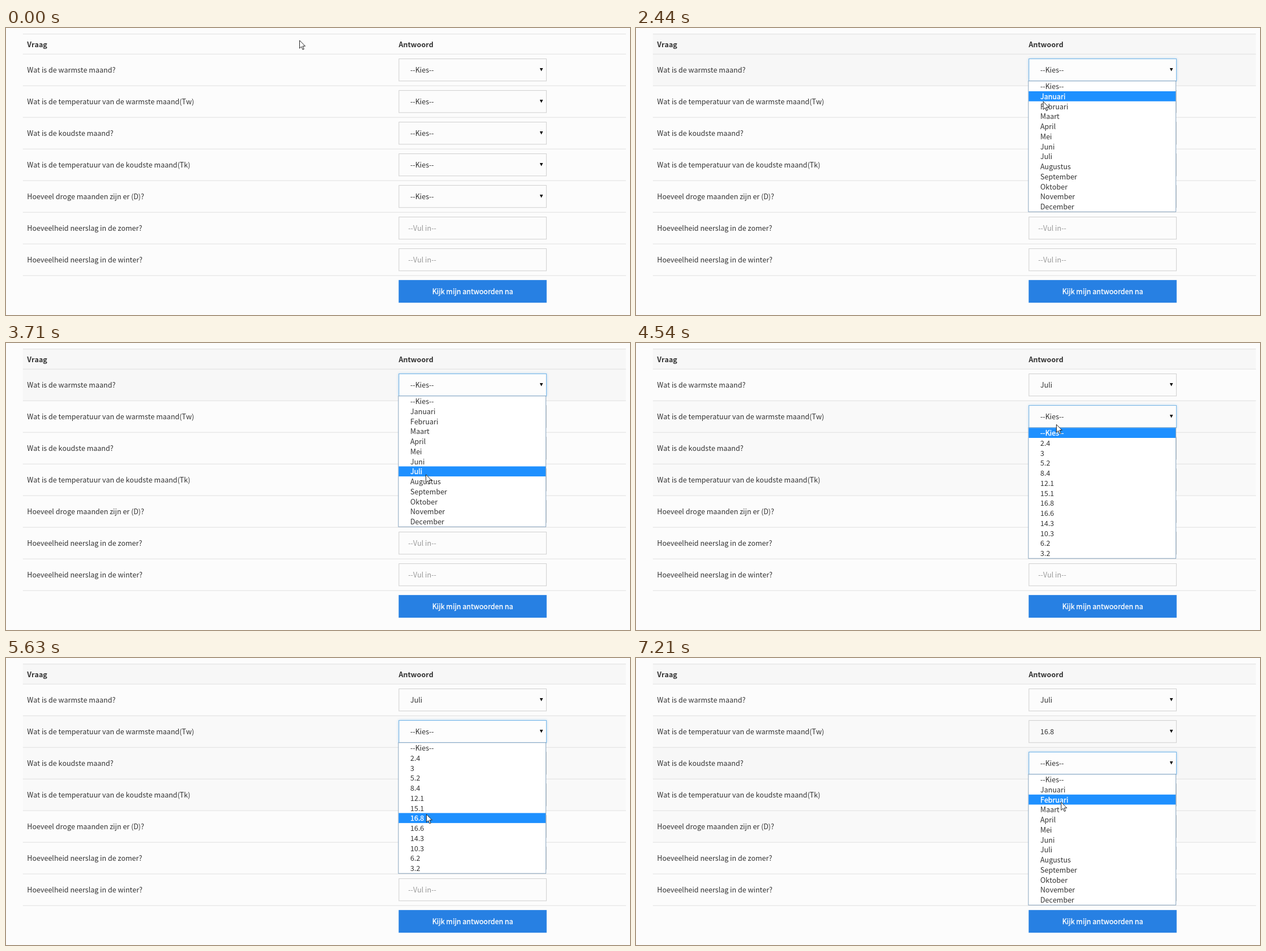
Recreate the animation shown at these times as an HTML page. Size 1102 by 508 pixels, loop 8000 ms.

```html
<!DOCTYPE html>
<html lang="nl">
<head>
<meta charset="utf-8">
<title>Klimaatvragen</title>
<style>
html, body { margin: 0; width: 100%; height: 100%; overflow: hidden; background: #fcfcfc; }
svg { display: block; }
text {
  font: 13.42px "Noto Sans CJK JP", "Noto Sans CJK SC", "Noto Sans CJK", "Open Sans", sans-serif;
  font-kerning: none; fill: #333; white-space: pre;
}
.head { font-weight: bold; }
.hint { fill: #999; }
.light { fill: #fff; stroke: #fff; stroke-width: .35px; }
.line { stroke: #ddd; }
.box { fill: none; stroke: #ccc; }
.focus { fill: #fdfdfd; stroke: #66afe9; filter: drop-shadow(0 0 2px rgba(102, 175, 233, .45)); }
.list { fill: #fff; stroke: #7f9db9; }
</style>
</head>
<body>
<svg width="1102" height="508" viewBox="0 0 1102 508"><g id="page"></g></svg>
<script>
// The page is laid out in whole pixels and shown at 14/15 of its size
const SCALE = 14 / 15, LOOP = 8000;
const PITCH = 60, ITEM = 19, LEFT = 743, BOX_W = 280, BOX_H = 43;
const KIES = '--Kies--';
const PAGE = '#fcfcfc', HOVER = '#f7f7f7', FAINT = '#f9f9f9';
const page = document.getElementById('page');
page.setAttribute('transform', `scale(${SCALE})`);

const questions = [
  'Wat is de warmste maand?',
  'Wat is de temperatuur van de warmste maand(Tw)',
  'Wat is de koudste maand?',
  'Wat is de temperatuur van de koudste maand(Tk)',
  'Hoeveel droge maanden zijn er (D)?',
  'Hoeveelheid neerslag in de zomer?',
  'Hoeveelheid neerslag in de winter?'
];
const months = [KIES, ...('Januari Februari Maart April Mei Juni Juli Augustus ' +
  'September Oktober November December').split(' ')];
const temps = [KIES, ...'2.4 3 5.2 8.4 12.1 15.1 16.8 16.6 14.3 10.3 6.2 3.2'.split(' ')];

// Select boxes that get used: focus and list times, and the final choice
const picks = [
  { items: months, focus: 1640, blur: 4360, open: 1700, close: 3960, value: 'Juli' },
  { items: temps, focus: 4400, blur: 6530, open: 4450, close: 6100, value: '16.8' },
  { items: months, focus: 6530, blur: 9000, open: 6460, close: 9000, value: KIES }
];

// Pointer path in stage pixels: time, x, y
const path = [
  [780, 519, 21], [1380, 671, 66], [1580, 735, 79], [1900, 735, 79],
  [2440, 720, 130], [3240, 738, 194], [3300, 738, 196], [3710, 742, 232],
  [3990, 742, 232], [4350, 743, 144], [4770, 743, 144], [5140, 743, 197],
  [5570, 743, 270], [5630, 743, 276], [5670, 743, 282], [6130, 743, 282],
  [6420, 752, 192], [6570, 752, 192], [6890, 752, 238], [6940, 752, 243], [7210, 751, 255]
];

// Row shading: time, row (0 is the header), colour
const shades = [
  [820, 0, HOVER], [1120, 1, HOVER],
  [3990, 1, PAGE], [3990, 4, FAINT], [4080, 3, FAINT], [4300, 2, FAINT],
  [6150, 5, FAINT], [6380, 3, HOVER]
];

function add(tag, attrs, parent = page, content) {
  const el = document.createElementNS('http://www.w3.org/2000/svg', tag);
  for (const k in attrs) el.setAttribute(k, attrs[k]);
  if (content) el.textContent = content;
  parent.append(el);
  return el;
}
const rect = (x, y, width, height, more, parent) =>
  add('rect', { x, y, width, height, ...more }, parent);
const frame = (x, y, w, h, more, parent) => rect(x + .5, y + .5, w - 1, h - 1, more, parent);
const label = (x, y, content, cls = '', parent) =>
  add('text', { x, y, class: cls }, parent, content);
const line = y => add('path', { d: `M32 ${y + .5}H1173`, class: 'line' });
const show = (el, on) => el.setAttribute('visibility', on ? 'visible' : 'hidden');
const lineTop = row => 49 + PITCH * row;
const boxTop = row => lineTop(row) + 9;

const rows = [rect(32, 11, 1141, 38)];
questions.forEach((q, i) => rows.push(rect(32, lineTop(i), 1141, PITCH)));
line(11);
for (let i = 0; i <= questions.length; i++) line(lineTop(i));
label(40, 36, 'Vraag', 'head');
label(LEFT, 36, 'Antwoord', 'head');

const fields = questions.map((q, i) => {
  const y = boxTop(i), select = i < 5;
  label(40, y + 27, q);
  frame(LEFT, y, BOX_W, BOX_H, { class: 'box' });
  const focus = frame(LEFT, y, BOX_W, BOX_H, { class: 'focus', opacity: 0 });
  const value = select ? label(765, y + 27, KIES) : label(761, y + 27, '--Vul in--', 'hint');
  if (select) add('path', { d: `M1010 ${y + 18}h6l-3 6z`, fill: '#000' });
  return { focus, value };
});

const button = boxTop(questions.length);
rect(LEFT, button, BOX_W, BOX_H, { fill: '#2780e3' });
label(LEFT + BOX_W / 2, button + 27, 'Kijk mijn antwoorden na', 'light')
  .setAttribute('text-anchor', 'middle');

picks.forEach((p, i) => {
  p.top = boxTop(i) + BOX_H;
  p.list = add('g', {});
  frame(LEFT - 1, p.top - 1, BOX_W, ITEM * p.items.length + 2, { class: 'list' }, p.list);
  p.bar = rect(LEFT, 0, BOX_W - 2, ITEM, { fill: '#1e90ff' }, p.list);
  p.texts = p.items.map((s, k) => label(765, p.top + ITEM * k + 15, s, '', p.list));
});

const pointer = add('path', {
  d: 'M-.5 .5V15.6L3 12.3L5.5 18L7.8 17L5.4 11.4H10.2Z',
  fill: '#fff', stroke: '#111'
});

function pointerAt(t) {
  const n = path.findIndex(p => p[0] > t);
  if (n === 0) return path[0].slice(1);
  if (n < 0) return path[path.length - 1].slice(1);
  const [t0, x0, y0] = path[n - 1], [t1, x1, y1] = path[n];
  const k = (t - t0) / (t1 - t0);
  return [x0 + (x1 - x0) * k, y0 + (y1 - y0) * k];
}

const fade = (t, start) => Math.min(1, Math.max(0, (t - start) / 150));

function render(t) {
  const [x, y] = pointerAt(t).map(v => v / SCALE);
  pointer.setAttribute('transform', `translate(${Math.round(x)} ${Math.round(y)})`);

  const fills = rows.map(() => PAGE);
  for (const [start, row, colour] of shades) if (t >= start) fills[row] = colour;
  rows.forEach((r, i) => r.setAttribute('fill', fills[i]));

  picks.forEach((p, i) => {
    const open = t >= p.open && t < p.close;
    fields[i].focus.setAttribute('opacity', fade(t, p.focus) - fade(t, p.blur));
    fields[i].value.textContent = t >= p.close ? p.value : KIES;
    show(p.list, open);
    if (!open) return;
    const hot = Math.max(0, Math.floor((y - p.top - .5) / ITEM));
    p.bar.setAttribute('y', p.top + ITEM * hot);
    p.texts.forEach((el, k) => el.setAttribute('class', k === hot ? 'light' : ''));
  });
}

function tick() {
  render(performance.now() % LOOP);
  requestAnimationFrame(tick);
}
tick();
</script>
</body>
</html>
```
